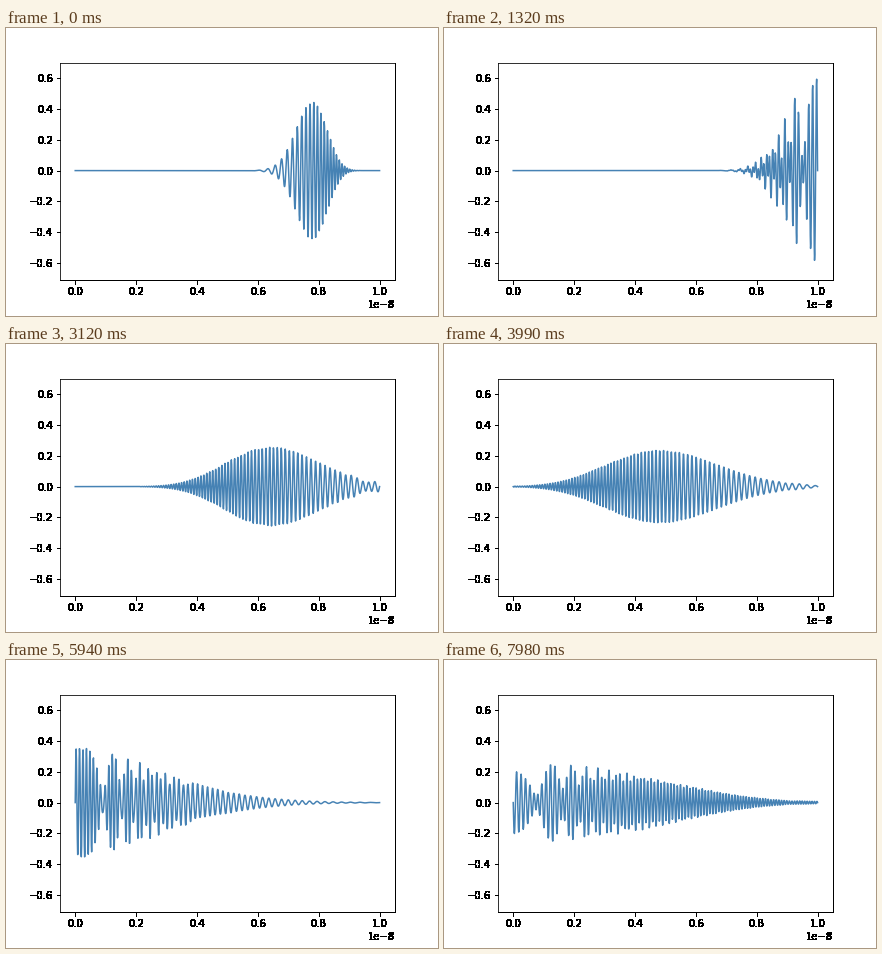
A matplotlib script for the animation above (8 s loop, 432 by 288 pixels).

```python
import numpy as np
import matplotlib.pyplot as plt
from matplotlib.animation import FuncAnimation

# Electron wave packet in a hard-walled box, Crank-Nicolson time stepping
HBAR = 1.0545718e-34
MASS = 9.109e-31
LENGTH = 1e-8
CELLS = 1000
DT = 1e-18
SIGMA = 1e-10
KAPPA = 5e10

FRAMES = 267
LOOP_MS = 8000
FIRST_STEP = 501
STEPS_PER_FRAME = 10


def packet(x):
    offset = x - LENGTH / 2
    return np.exp(-offset**2 / (2 * SIGMA**2)) * np.exp(1j * KAPPA * x)


def evolve(x, steps):
    """Real part of psi, one column per step, from the scheme's sine modes."""
    theta = np.pi * np.arange(1, CELLS) / CELLS
    modes = np.sin(np.outer(np.arange(CELLS + 1), theta))
    weights = 2 / CELLS * (modes.T @ packet(x))
    dx = LENGTH / CELLS
    coupling = HBAR * DT / (2 * MASS * dx**2)
    phase = 2 * np.arctan(coupling * (1 - np.cos(theta)))
    turning = weights[:, None] * np.exp(-1j * np.outer(phase, steps))
    return modes @ turning.real


def solid(image, dpi):
    """Turn every touched pixel fully black, for crisp heavy lettering."""
    out = np.zeros_like(image)
    out[..., 3] = image[..., 3] > 0
    return out, 0, 0


x = np.linspace(0, LENGTH, CELLS + 1)
waves = evolve(x, FIRST_STEP + STEPS_PER_FRAME * np.arange(FRAMES))

fig, ax = plt.subplots(figsize=(6, 4), dpi=72, facecolor="white")
fig.subplots_adjust(left=0.125, right=0.9, bottom=0.125, top=0.88)
line, = ax.plot(x, waves[:, 0], color="steelblue")

low, high = waves.min(), waves.max()
margin = 0.05 * (high - low)
ax.set_ylim(low - margin, high + margin)

for axis in (ax.xaxis, ax.yaxis):
    axis.set_agg_filter(solid)
for side in ("right", "bottom"):
    ax.spines[side].set_linewidth(1)


def draw(i):
    line.set_ydata(waves[:, i])
    return line,


anim = FuncAnimation(fig, draw, frames=FRAMES, interval=LOOP_MS / FRAMES,
                     repeat=True, repeat_delay=0)
plt.show()
```
